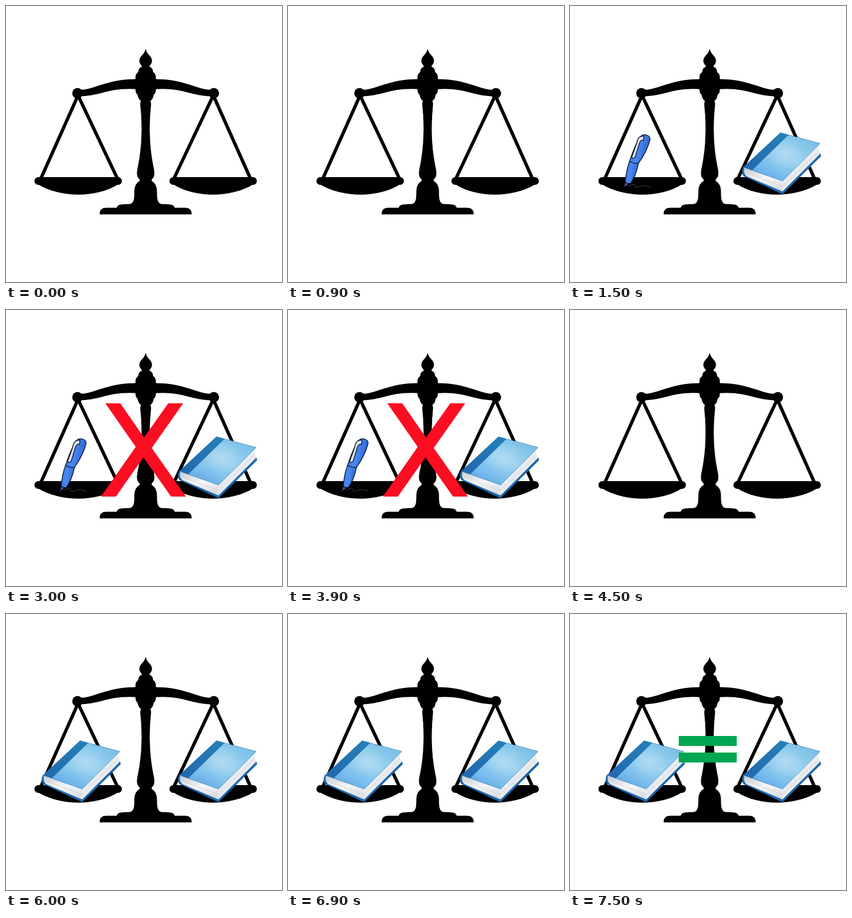
An HTML page that plays this animation: 500 px wide and 500 px high, repeating every 8 s.

```html
<!DOCTYPE html>
<html lang="en">
<head>
<meta charset="utf-8">
<title>Balance</title>
<style>
  html, body { margin: 0; width: 100%; height: 100%; overflow: hidden; background: #fff; }
  svg { display: block; width: 100vw; height: 100vh; }
</style>
</head>
<body>
<svg viewBox="0 0 500 500">
  <defs>
    <linearGradient id="cover" x1="0.1" y1="1" x2="0.85" y2="0.1">
      <stop offset="0" stop-color="#4c9cdf"/>
      <stop offset="0.3" stop-color="#7abdec"/>
      <stop offset="0.6" stop-color="#9dd2f0"/>
      <stop offset="1" stop-color="#78c0e6"/>
    </linearGradient>
    <radialGradient id="sheen">
      <stop offset="0" stop-color="#b9dcf2" stop-opacity="0.8"/>
      <stop offset="1" stop-color="#a8dcf2" stop-opacity="0"/>
    </radialGradient>
    <linearGradient id="spine" x1="0" y1="1" x2="1" y2="0">
      <stop offset="0" stop-color="#2267ad"/>
      <stop offset="1" stop-color="#2581b9"/>
    </linearGradient>
    <linearGradient id="pages" x1="0" y1="0" x2="0.25" y2="1">
      <stop offset="0" stop-color="#c3c9d0"/>
      <stop offset="0.55" stop-color="#f6f6f7"/>
      <stop offset="1" stop-color="#dcdfe3"/>
    </linearGradient>
    <linearGradient id="ink" x1="0" y1="0" x2="1" y2="0.25">
      <stop offset="0" stop-color="#3a74e2"/>
      <stop offset="0.5" stop-color="#4a88f0"/>
      <stop offset="1" stop-color="#2f66d2"/>
    </linearGradient>

    <g id="arm">
      <path d="M130 152C160 153 181 132 237 132.5V151C186 147 175 163 130 164Z"/>
      <circle cx="129.5" cy="158" r="9.5"/>
      <path d="M63 313L130.5 162L202 313" fill="none" stroke="#000" stroke-width="6"/>
      <path d="M58 310H203V323C164 348 99 348 58 323Z"/>
      <circle cx="58.5" cy="317" r="7"/>
      <circle cx="203" cy="317" r="7"/>
    </g>

    <path id="half-post" stroke="#000" d="M253 79C251 88 242 91 242 99C242 105 246 107 247 110
      Q240 112 240 120C236 122 235 126 235 130V152Q235 158 239 161Q240 169 245 172
      Q243 175 244 182C248 221 246 257 240 288Q236 304 239 310Q243 314 243 317
      Q234 321 233 334C233 348 233 355 226 359L209 360Q201 361 201 366H181
      Q170 366 170 377H253Z"/>

    <g id="book">
      <path d="M314 291Q309 301 314 308L385 341L455 272L453 266L386 320Z" fill="#1d65ad"/>
      <path d="M316 292L385 314V336L319 308Q313 301 316 292Z" fill="url(#pages)"/>
      <path d="M385 314L452 248Q447 259 453 268L385 336Z" fill="#e9ebee"/>
      <path d="M317 301L385 327L450 263" fill="none" stroke="#c9ced5" stroke-width="0.8"/>
      <path d="M381 229.5L453 249L385 317L314 292Z" fill="url(#cover)"/>
      <ellipse cx="390" cy="268" rx="35" ry="28" fill="url(#sheen)"/>
      <path d="M381 229.5L396 233.5L330 297.5L314 292Z" fill="url(#spine)"/>
      <path d="M381 229.5L453 249L385 317L314 292" fill="none" stroke="#3580bd" stroke-width="0.8"/>
    </g>

    <g id="pen" stroke="#07152e" stroke-width="1.4" stroke-linejoin="round">
      <path d="M103 326L116 323L119 329L132 325L146 328" fill="none" stroke="#444" stroke-width="1"/>
      <path d="M102 315L97 329L110 319Z" fill="#5c6a84"/>
      <path d="M108 281L124 285C121 300 116 312 110 321Q104 323 100 319C101 307 103 294 108 281Z" fill="url(#ink)"/>
      <path d="M108 281C113 266 119 249 127 238C132 230 146 233 145 242C141 258 132 274 124 285Q114 286 108 281Z" fill="url(#ink)"/>
      <path d="M134 236Q123 234 121 248L112 273Q113 279 118 274L126 248Q129 241 133 244Z" fill="#d9dee6"/>
    </g>
  </defs>

  <rect width="500" height="500" fill="#fff"/>
  <use href="#arm"/>
  <use href="#arm" transform="matrix(-1 0 0 1 506 0)"/>
  <use href="#half-post"/>
  <use href="#half-post" transform="matrix(-1 0 0 1 506 0)"/>

  <use href="#pen" data-show="1500-4500"/>
  <use href="#book" data-show="1500-4500 6000-8000"/>
  <use href="#book" x="-247" data-show="6000-8000"/>
  <path data-show="3000-4500" fill="#fc0d21"
    d="M180 169H207L250 231L294 169H321L264 250L326 338H299L249 267L199 338H172L235 248Z"/>
  <path data-show="7500-8000" fill="#00a650" d="M197 221H302V239H197ZM197 251H302V269H197Z"/>
</svg>
<script>
  const LOOP = 8000;
  const parts = [...document.querySelectorAll('[data-show]')].map(element => ({
    element,
    spans: element.dataset.show.split(' ').map(span => span.split('-').map(Number))
  }));
  const start = performance.now();

  function draw(now) {
    const time = Math.max(0, now - start) % LOOP;
    for (const { element, spans } of parts) {
      const visible = spans.some(([from, to]) => time >= from && time < to);
      element.style.display = visible ? '' : 'none';
    }
    requestAnimationFrame(draw);
  }
  draw(start);
</script>
</body>
</html>
```
